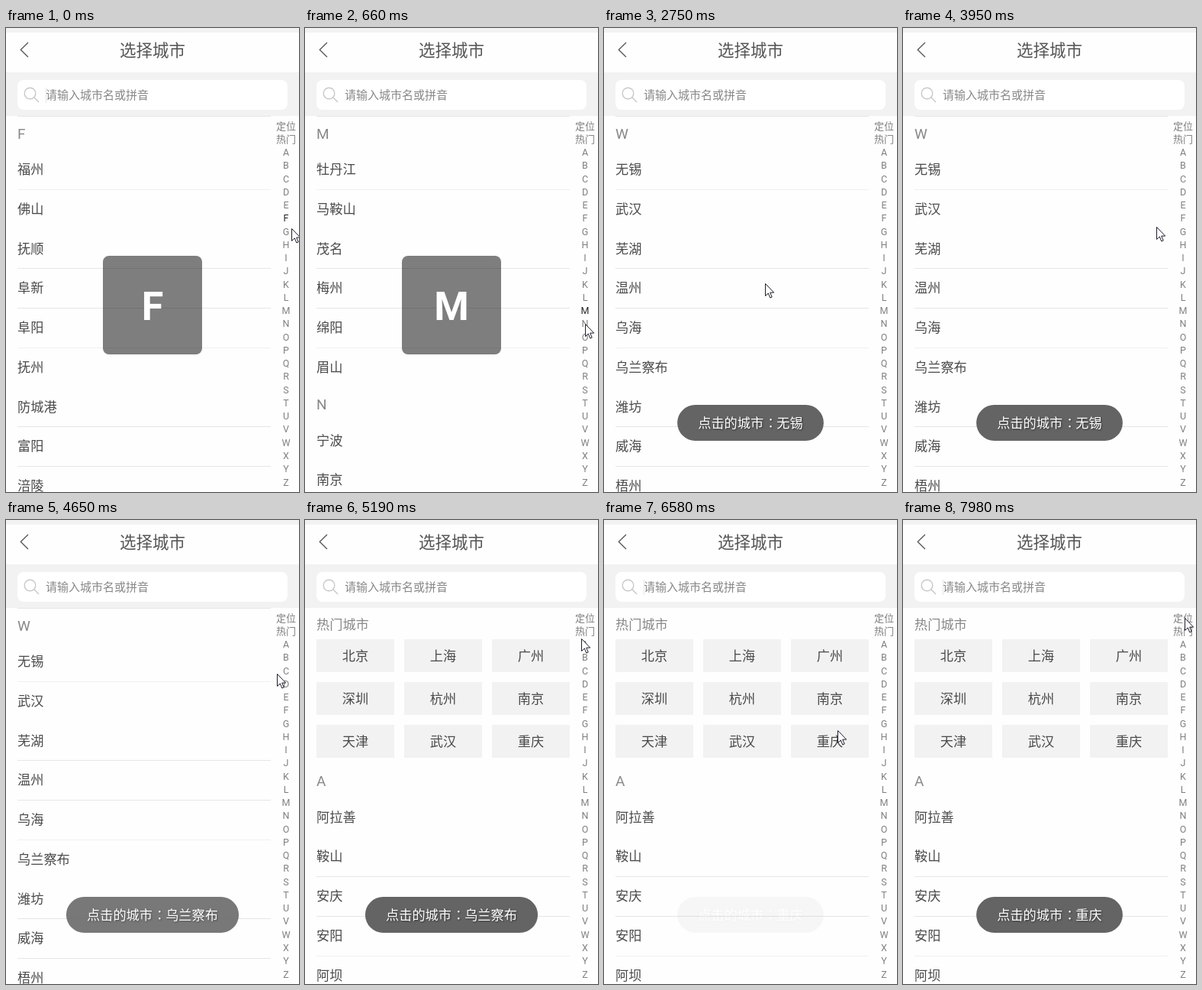
An HTML page that plays this animation: 384x607 px, repeating every 8 s.

```html
<!DOCTYPE html>
<html lang="zh-CN">
<head>
<meta charset="utf-8">
<title>选择城市</title>
<style>
  html, body { margin: 0; width: 100%; height: 100%; overflow: hidden; background: #fefefe; }
  svg { display: block; width: 100vw; height: 100vh; }
  text { font-family: Roboto, "Noto Sans CJK SC", "Noto Sans CJK", sans-serif; white-space: pre; }
  .city { font-size: 17.2px; fill: #4a4a4a; }
  .head { font-size: 19px; fill: #888; }
  .hot { font-size: 17.2px; fill: #888; }
  .index { font-size: 12.5px; fill: #808080; text-anchor: middle; }
  .index.on { fill: #222; }
  .mid { text-anchor: middle; }
  .toast text { font-size: 17.2px; fill: #fff; filter: drop-shadow(1px 1px 1px #333); }
</style>
</head>
<body>
<svg id="stage" viewBox="0 0 384 607">
  <rect width="384" height="607" fill="#fefefe"/>
  <rect width="384" height="6" fill="#f2f2f2"/>
  <path d="M29 19 19.3 28.5 29 38" fill="none" stroke="#555" stroke-width="1.3"/>
  <text class="mid" x="192" y="36.5" font-size="21.5" fill="#555">选择城市</text>
  <rect y="58" width="384" height="57" fill="#f2f2f2"/>
  <rect x="15" y="68" width="354" height="39" rx="8" fill="#fff"/>
  <g fill="none" stroke="#c8c8c8" stroke-width="1.4">
    <circle cx="31.5" cy="85.5" r="7.3"/>
    <path d="M36.8 90.8 43 97"/>
  </g>
  <text x="52" y="93" font-size="15" fill="#888">请输入城市名或拼音</text>
  <rect id="caret" x="52" y="78" width="1" height="20" fill="#e4e4e4"/>
  <g id="views"></g>
  <g id="index"></g>
  <g id="bubble">
    <rect x="127" y="298" width="130" height="129" rx="8" fill="#000" fill-opacity=".5"/>
    <text id="letter" class="mid" x="192" y="381.5" font-size="52" font-weight="700" fill="#fff"></text>
  </g>
  <g id="toasts"></g>
  <path id="cursor" d="M.5 .5V16.5L4.3 13 6.8 19 9.2 18 6.7 12.1H11.7Z" fill="#fff" stroke="#1c1c2c"/>
</svg>
<script>
const LOOP = 8000, STEP = 130, BOTTOM = 607;
const TOP = 115.5, HEAD = 44, ROW = 51.75;
const INDEX_TOP = 128, INDEX_ROW = 17.26;
const RELEASE = 1500, TAP_HOT = 5060;

const cities = {
  A: '阿拉善 鞍山 安庆 安阳 阿坝',
  F: '福州 佛山 抚顺 阜新 阜阳 抚州 防城港 富阳 涪陵',
  G: '广州 贵阳 桂林 赣州 广元 贵港 固原 广安 甘南',
  H: '杭州 哈尔滨 合肥 海口 惠州 湖州 邯郸 衡阳 淮安',
  J: '济南 嘉兴 金华 江门 九江 吉林 荆州 济宁 锦州',
  K: '昆明 开封 喀什 克拉玛依',
  L: '兰州 洛阳 连云港 柳州 廊坊 临沂 丽水 泸州 乐山',
  M: '牡丹江 马鞍山 茂名 梅州 绵阳 眉山',
  N: '宁波 南京 南昌 南宁 南通 南充 南阳 宁德 南平',
  P: '莆田 平顶山 盘锦 攀枝花 萍乡',
  Q: '青岛 泉州 秦皇岛 清远 衢州 曲靖 钦州 黔南 庆阳',
  R: '日照 日喀则',
  S: '上海 深圳 苏州 沈阳 石家庄 绍兴 汕头 韶关 三亚',
  T: '天津 太原 唐山 泰州 台州 泰安 铁岭 通辽 铜陵',
  W: '无锡 武汉 芜湖 温州 乌海 乌兰察布 潍坊 威海 梧州'
};
const keys = Object.keys(cities);
const hotCities = '北京 上海 广州 深圳 杭州 南京 天津 武汉 重庆'.split(' ');
const names = ['定位', '热门', ...'ABCDEFGHIJKLMNOPQRSTUVWXYZ'];

// Pointer path: time, x, y
const path = [
  [0, 374, 262], [660, 367, 387], [1350, 371, 556], [RELEASE, 367, 514],
  [2050, 358, 203], [2450, 358, 203], [2750, 211, 334], [3380, 279, 420],
  [4110, 358, 180], [4650, 355, 201], [5310, 364, 143], [5730, 201, 203],
  [6430, 298, 290], [7550, 371, 154], [7980, 369, 128]
];

// City tapped, toast start and end
const toasts = [['无锡', 2400, 4530], ['乌兰察布', 4390, 6430], ['重庆', 6540, 9000]];

const $ = id => document.getElementById(id);

function add(parent, tag, attrs, content) {
  const el = document.createElementNS('http://www.w3.org/2000/svg', tag);
  for (const k in attrs) el.setAttribute(k, attrs[k]);
  if (content) el.textContent = content;
  parent.appendChild(el);
  return el;
}

function label(parent, cls, x, y, content) {
  return add(parent, 'text', { class: cls, x, y }, content);
}

function divider(parent, y, fill) {
  add(parent, 'rect', { x: 15, y: Math.floor(y), width: 332, height: 1, fill });
}

// Dividers cycle light, none, full, full; phase sets where the cycle starts.
const tones = ['#f0f0f0', 'none', '#e6e6e6', '#e6e6e6'];

function section(parent, key, y, phase) {
  label(parent, 'head', 15, y + 29.2, key);
  y += HEAD;
  cities[key].split(' ').forEach((name, i) => {
    label(parent, 'city', 15, y + 31.7, name);
    y += ROW;
    divider(parent, y, tones[(i + phase) % 4]);
  });
  return y;
}

const views = {};
keys.slice(1).forEach((key, i) => {
  const g = views[key] = add($('views'), 'g', {});
  divider(g, TOP, '#e6e6e6');
  let y = section(g, key, TOP, 0);
  for (let next = i + 2; y < BOTTOM && next < keys.length; next++) y = section(g, keys[next], y, 1);
});

const hot = views['热门'] = add($('views'), 'g', {});
label(hot, 'hot', 15, 142.5, '热门城市');
hotCities.forEach((name, i) => {
  const x = 15 + i % 3 * 115, y = 156 + Math.floor(i / 3) * 56;
  add(hot, 'rect', { x, y, width: 102, height: 43, fill: '#f2f2f2' });
  label(hot, 'city mid', x + 51, y + 27.8, name);
});
section(hot, 'A', 319, 1);

const index = names.map((name, i) => {
  const el = label($('index'), 'index', 367, INDEX_TOP + 4.5 + i * INDEX_ROW, name);
  if (i < 2) el.style.fontSize = '13px';
  return el;
});

const toastEls = toasts.map(([name]) => {
  const w = 54.2 + (name.length + 6) * 17.2, x = 192 - w / 2;
  const g = add($('toasts'), 'g', { class: 'toast' });
  add(g, 'rect', { x, y: 493, width: w, height: 47, rx: 23.5, fill: '#646464' });
  const text = label(g, '', x + 27.1, 522.5, '点击的城市');
  add(text, 'tspan', { dx: 5, dy: -1 }, '：');
  add(text, 'tspan', { dx: -5, dy: 1 }, name);
  return g;
});

const show = (el, on) => { el.style.display = on ? '' : 'none'; };

// Each stretch of the path is refreshed in even steps of about STEP ms.
function sample(now) {
  const next = path.findIndex(p => p[0] > now);
  const i = next < 0 ? path.length - 1 : next;
  const a = path[i - 1], b = path[i], span = b[0] - a[0];
  const n = Math.round(span / STEP);
  const k = Math.min(1, Math.floor((now - a[0]) / span * n) / n);
  return a.map((v, j) => Math.round(v + (b[j] - v) * k));
}

// The list trails the finger by one row.
function letterAt(t, y) {
  if (t >= TAP_HOT) return '热门';
  if (t >= 1350) return 'W';
  return names[Math.round((y - INDEX_TOP) / INDEX_ROW - 1)];
}

function draw(now) {
  const [t, x, y] = sample(now);
  const letter = letterAt(t, y);
  const view = views[letter] ? letter : keys.filter(k => k < letter).pop();
  const held = t < RELEASE;
  for (const k in views) show(views[k], k === view);
  index.forEach((el, i) => el.classList.toggle('on', held && names[i] === letter));
  show($('bubble'), held);
  $('letter').textContent = letter;
  show($('caret'), t < 500 || t >= 5310);
  toasts.forEach(([, from, to], i) => {
    const a = Math.max(0, Math.min(1, (t - from) / 300, (to - t) / 300));
    toastEls[i].setAttribute('opacity', a);
  });
  $('cursor').setAttribute('transform', `translate(${x} ${y})`);
}

function frame() {
  draw(performance.now() % LOOP);
  requestAnimationFrame(frame);
}
frame();
</script>
</body>
</html>
```
